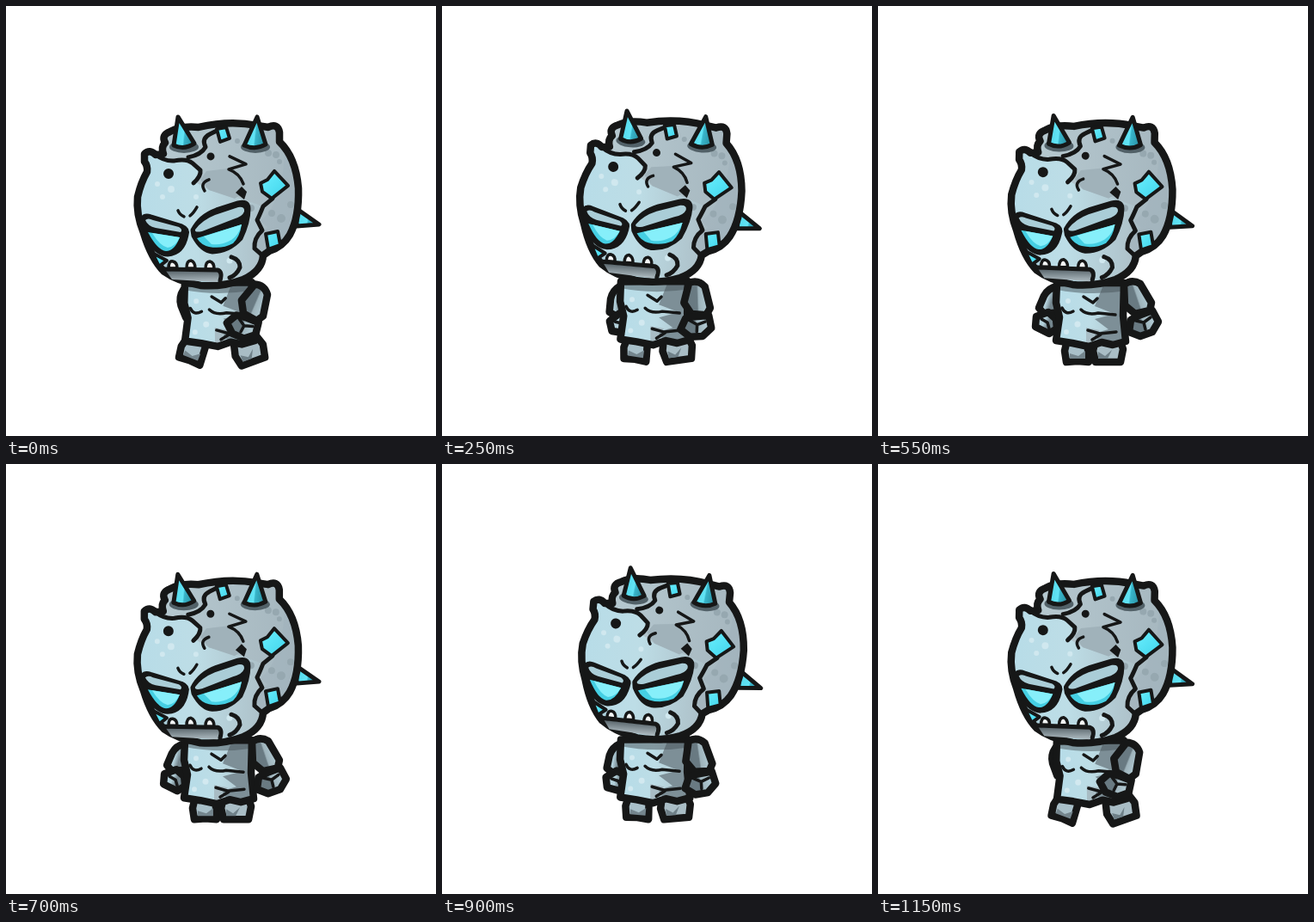
An HTML page that plays this animation: 500 px wide and 500 px high, repeating every 1.2 s.

```html
<!DOCTYPE html>
<html>
<head>
<meta charset="utf-8">
<style>
html, body { margin: 0; width: 100%; height: 100%; overflow: hidden; background: #fff; }
svg { display: block; width: 100%; height: 100%; }
.ink { stroke: #161717; stroke-width: 8.5; stroke-linejoin: round; stroke-linecap: round; }
.mid { stroke-width: 5; }
.thin { stroke-width: 3.5; }
.line { fill: none; }
</style>
</head>
<body>
<svg viewBox="0 0 500 500">
  <defs>
    <linearGradient id="skin">
      <stop offset="0" stop-color="#b6dce8"/><stop offset=".5" stop-color="#bddde6"/><stop offset="1" stop-color="#adc0c8"/>
    </linearGradient>
    <linearGradient id="skull">
      <stop offset="0" stop-color="#b9ccd3"/><stop offset="1" stop-color="#a5b6be"/>
    </linearGradient>
    <linearGradient id="ice" x2="1" y2=".15">
      <stop offset="0" stop-color="#4fd5e8"/><stop offset=".55" stop-color="#62e4f5"/><stop offset=".62" stop-color="#38b4c9"/><stop offset="1" stop-color="#2b93a6"/>
    </linearGradient>
    <linearGradient id="gem" x2="1" y2="1">
      <stop offset="0" stop-color="#6cf0ff"/><stop offset="1" stop-color="#3fd3ea"/>
    </linearGradient>
    <linearGradient id="lip" x2=".1" y2="1">
      <stop offset="0" stop-color="#59656b"/><stop offset="1" stop-color="#a9b6bc"/>
    </linearGradient>
    <linearGradient id="limb" x1="1" x2="0" y2=".4">
      <stop offset=".35" stop-color="#aec6cf"/><stop offset=".6" stop-color="#9db2ba"/><stop offset=".65" stop-color="#697a82"/>
    </linearGradient>
    <linearGradient id="limbL" x2="1" y2=".4">
      <stop offset=".5" stop-color="#b3d0da"/><stop offset=".7" stop-color="#74868e"/>
    </linearGradient>
    <path id="bodyShape" d="M208 322L207 345 211 362 207 389 226 392 245 396 260 391 273 394 288 390 285 360 286 322Z"/>
    <path id="headShape" d="M161 172Q167 166 174 173L183 172Q180 164 185 159 180 150 191 146 203 139 224 141 260 133 292 139L305 141Q316 136 318 147L318 158Q337 176 340 212 341 246 330 266 322 280 306 285L299 290Q298 308 276 318 252 327 226 325 199 320 184 309 169 294 160 264 151 242 153 222 157 205 164 193 165 186 161 181Z"/>
    <clipPath id="headClip"><use href="#headShape"/></clipPath>
    <clipPath id="bodyClip"><use href="#bodyShape"/></clipPath>
  </defs>

  <g id="armL" class="ink" fill="url(#limbL)">
    <path d="M208 326Q198 328 193 337L187 351 193 358 212 356Z"/>
    <path d="M184 361L198 356 207 364 208 375 199 381 183 373Z"/>
    <path class="thin line" d="M190 364L197 368 199 375"/>
  </g>

  <g id="legL" class="ink">
    <path fill="#a9c0c9" d="M221 384L243 384 245 414 232 413 219 414 217 401Z"/>
    <path fill="#74858d" stroke="none" d="M223 404L233 407 241 401 241 410 223 410Z"/>
  </g>
  <g id="legR" class="ink">
    <path fill="#a9bdc5" d="M254 384L280 384 285 399 282 414 253 414 250 401Z"/>
    <path fill="#6f8088" stroke="none" d="M256 402L264 407 272 400 267 410 256 410Z"/>
  </g>

  <g id="body">
    <use href="#bodyShape" fill="url(#skin)"/>
    <g clip-path="url(#bodyClip)">
      <path fill="#7d8f97" d="M264 320L290 320 290 398 262 396 250 381 268 376 252 364 275 358 252 349Z"/>
      <path fill="#a8bcc4" d="M242 374L258 377 251 384 262 394 242 396Z"/>
      <g fill="#d2e9f0">
        <circle cx="221" cy="343" r="3"/><circle cx="232" cy="370" r="3.5"/><circle cx="219" cy="379" r="3"/>
      </g>
      <path fill="#48545a" opacity=".5" d="M204 322H290V331Q245 338 204 329Z"/>
    </g>
    <path class="ink thin line" d="M214 351Q218 360 227 355M239 338L250 345 255 340M236 353Q243 360 256 357L276 359M244 377L258 381 277 379M249 388L259 382"/>
    <use href="#bodyShape" class="ink line"/>
  </g>

  <g id="armR" class="ink" fill="url(#limb)">
    <path d="M286 324Q295 317 305 323L318 345 316 354 299 358 287 348Z"/>
    <path d="M294 365L303 360 319 354 326 367 319 379 305 384 292 379Z"/>
    <path class="thin line" d="M300 366L309 368 317 362M309 368L311 376"/>
  </g>

  <g id="head">
    <path class="ink mid" fill="url(#ice)" d="M338 236L364 254 338 256Z"/>
    <use href="#headShape" fill="url(#skull)"/>
    <g clip-path="url(#headClip)">
      <path fill="url(#skin)" d="M145 166L174 174 196 180 214 180 226 191 219 204 236 214 268 222 299 233 292 249 298 261 288 273 300 292 280 335 180 335 140 270Z"/>
      <path fill="#a0b2ba" d="M233 192L258 189 270 198 278 216 266 224 236 214 226 202Z"/>
      <path fill="#9db0b8" opacity=".4" d="M324 150Q326 225 296 250L304 257 289 272 303 296 350 270 350 180Z"/>
      <path fill="#93b6c3" opacity=".4" d="M150 220Q164 300 222 320L270 320 240 335 170 320 140 250Z"/>
      <g fill="#96a8b0">
        <circle cx="305" cy="171" r="4"/><circle cx="314" cy="173" r="4"/><circle cx="318" cy="181" r="3"/>
        <circle cx="320" cy="247" r="5"/><circle cx="331" cy="231" r="4"/><circle cx="309" cy="241" r="4"/>
        <circle cx="285" cy="235" r="4"/><circle cx="269" cy="157" r="3"/>
      </g>
      <g fill="#d0e8ef">
        <circle cx="192" cy="213" r="4"/><circle cx="182" cy="222" r="3"/><circle cx="221" cy="222" r="3"/>
        <circle cx="260" cy="296" r="3.5"/><circle cx="176" cy="207" r="3"/>
      </g>
    </g>
    <use href="#headShape" class="ink line"/>

    <g class="ink line mid">
      <path d="M174 173Q184 181 196 180 210 177 217 183L226 191Q227 198 218 206"/>
      <path class="thin" d="M236 202Q225 206 231 215"/>
      <path d="M212 176Q227 173 232 164 227 154 237 149L247 144"/>
      <path class="thin" d="M260 175L279 184 259 190Q272 195 276 207"/>
      <path d="M310 224L299 233Q295 243 292 249L298 261Q288 270 289 282L298 290"/>
      <path class="thin" d="M200 238Q202 243 207 245M222 234Q218 241 214 244"/>
      <path d="M262 292Q272 295 272 304 268 313 260 316"/>
    </g>
    <g fill="#161717">
      <circle cx="189" cy="195" r="6"/><circle cx="238" cy="175" r="4.5"/>
      <path d="M267 217L274 210 280 216 277 225Z"/>
    </g>

    <ellipse cx="207" cy="164" rx="17" ry="7" fill="#526168"/>
    <ellipse cx="290" cy="164" rx="17" ry="7" fill="#526168"/>
    <g class="ink mid" fill="url(#ice)">
      <path d="M200 129L219 160Q207 168 195 162Z"/>
      <path d="M292 129L302 161Q290 168 277 162Z"/>
    </g>
    <g class="ink" style="stroke-width:4" fill="url(#gem)">
      <path d="M245 143L256 141 260 154 249 158Z"/>
      <path d="M296 206L304 202 312 192 328 209 309 224 298 216Z"/>
      <path d="M302 265L316 262 319 278 305 283Z"/>
      <path d="M170 287L187 296 178 303Z"/>
    </g>

    <g class="ink" style="stroke-width:7" fill="#161717">
      <path d="M160 247Q162 244 168 246L204 257Q211 260 209 266 205 287 188 288 177 288 166 272Z"/>
      <path d="M218 261Q226 245 245 238L270 230Q281 227 281 236 281 251 272 270 258 285 240 285 228 284 219 267Z"/>
    </g>
    <g fill="#aacdd7">
      <path d="M162 249Q165 246 171 249L201 257Q206 260 203 263L174 258Q165 256 162 249Z"/>
      <path d="M220 260Q228 249 243 243L270 234Q278 233 277 239 275 245 264 248L228 262Q219 264 220 260Z"/>
    </g>
    <g fill="#45cfe3">
      <path d="M165 263L202 269Q196 285 186 285 176 284 165 263Z"/>
      <path d="M222 270L274 254Q272 268 264 276 251 283 236 280 227 278 222 270Z"/>
    </g>
    <g fill="#86effa">
      <path d="M170 264L202 269Q197 280 188 281 179 279 170 264Z"/>
      <path d="M230 268L274 254Q271 266 262 272 250 279 239 277Z"/>
    </g>

    <path fill="url(#lip)" d="M186 308L248 309 246 321 193 318Z"/>
    <g class="ink thin" fill="#f4f7f7">
      <path d="M189 305Q189 296 194 297 199 298 199 305Z"/>
      <path d="M210 305Q210 296 215 296 220 298 220 305Z"/>
      <path d="M232 306Q232 297 237 297 242 298 242 306Z"/>
    </g>
    <path class="ink mid line" d="M185 306L246 307Q252 309 249 319"/>
  </g>
</svg>
<script>
const LOOP = 1200;
const el = id => document.getElementById(id);
const wave = (t, peak, period) => Math.cos((t - peak) / period * 2 * Math.PI);
const pose = (id, angle, x, y, dx, dy) =>
  el(id).setAttribute('transform', `translate(${dx} ${dy}) rotate(${angle} ${x} ${y})`);

function draw(now) {
  const t = Math.floor(now % LOOP / 50) * 50;
  const nod = 2.7 - 3.15 * wave(t, 52, 600);
  const bob = -0.9 * (1 + wave(t, 260, 600));
  const swing = ((1 + wave(t, 0, LOOP)) / 2) ** 2;
  const drop = 3 * swing * swing;

  pose('head', nod, 279, 330, 0, bob);
  pose('body', -swing, 245, 330, 0, bob);
  pose('armL', -45 * swing, 212, 330, 0, bob);
  pose('armR', 42 * swing, 288, 328, 0, bob);
  pose('legL', 21 * swing, 235, 372, -4 * swing, bob + drop);
  pose('legR', -20 * swing, 262, 372, 6 * swing, bob + drop + swing);
  requestAnimationFrame(draw);
}
requestAnimationFrame(draw);
</script>
</body>
</html>
```
